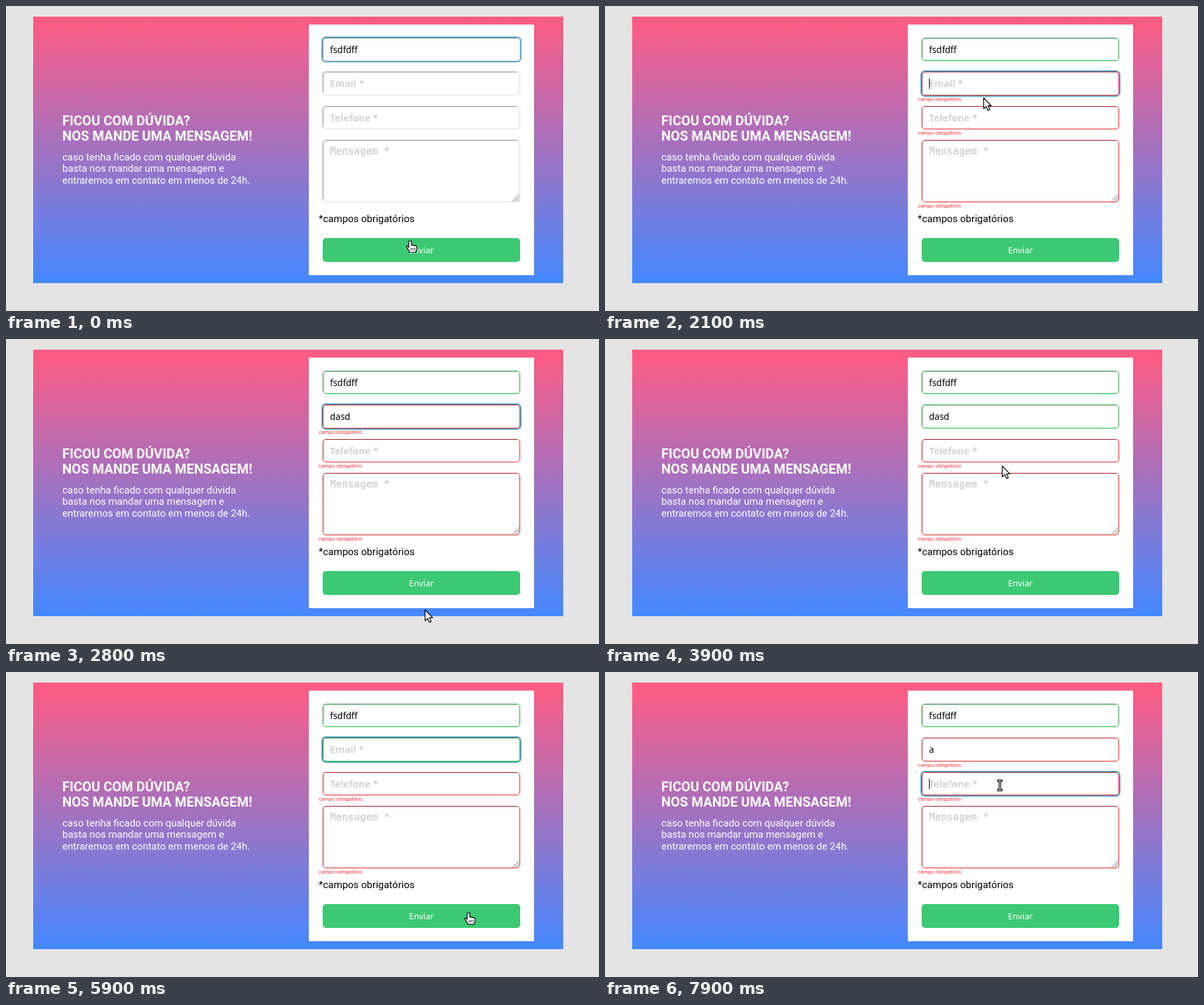
Recreate the animation shown at these times as an HTML page. Size 895 by 460 pixels, loop 8 s.

```html
<!DOCTYPE html>
<html lang="pt-BR">
<head>
<meta charset="utf-8">
<title>Formulário de contato</title>
<style>
  html, body { margin: 0; width: 100%; height: 100%; overflow: hidden; background: #e4e4e4; }
  svg { display: block; width: 895px; height: 460px; }
  text { white-space: pre; }
  .title { font: bold 20.1px Roboto, sans-serif; fill: #fff; }
  .body { font: 15px Roboto, sans-serif; }
  .error { font: 8px Roboto, sans-serif; fill: #ea2f38; }
  .value { font: 13.5px "Noto Sans", sans-serif; font-variant-ligatures: none; }
  .hint { font: bold 14.4px "Noto Sans", sans-serif; fill: #d3d3d3; }
  .mono { font: bold 15px "DejaVu Sans Mono", monospace; }
  .button { font: 12.8px "Noto Sans", sans-serif; fill: #fff; }
  .white { fill: #fff; }
  .option { fill: #dcdcdc; }
  .edge { fill: none; }
  .ring { fill: none; stroke: #62a5ca; stroke-width: 2; }
  .pointer { fill: #fff; stroke: #000; stroke-width: 1.2; stroke-linejoin: round; }
</style>
</head>
<body>
<svg viewBox="0 0 895 460">
  <defs>
    <linearGradient id="sky" x2="0" y2="1">
      <stop stop-color="#ff5b82"/><stop offset="1" stop-color="#4489ff"/>
    </linearGradient>
  </defs>
  <rect x="41" y="16" width="800" height="402" fill="url(#sky)"/>
  <rect x="457" y="28" width="340" height="378" fill="#fff"/>
  <text class="title" x="85" y="180">FICOU COM DÚVIDA?</text>
  <text class="title" x="85" y="203">NOS MANDE UMA MENSAGEM!</text>
  <text class="body white" x="85" y="233">caso tenha ficado com qualquer dúvida</text>
  <text class="body white" x="85" y="250">basta nos mandar uma mensagem e</text>
  <text class="body white" x="85" y="268">entraremos em contato em menos de 24h.</text>
  <text class="body" x="472" y="326">*campos obrigatórios</text>
  <rect x="478" y="350" width="298" height="36" rx="5" fill="#3dc973"/>
  <text class="button" x="627" y="373" text-anchor="middle">Enviar</text>
  <g id="fields"></g>
  <path d="M764 294.5L774.5 284M767 294.5L774.5 287M770 294.5L774.5 290M773 294.5L774.5 293" stroke="#858585"/>
  <rect id="selection" y="109" height="17" fill="#308cc6"/>
  <text id="selected" class="value white" y="122"></text>
  <rect id="caret" width="1" height="16"/>
  <g id="menu">
    <rect id="menuBox" x="478.5" y="134.5" width="297" fill="#3c3c3c" stroke="#262626"/>
    <rect id="hover" x="479" y="157" width="296" height="21" fill="#565656"/>
    <text class="value option" x="485" y="152">das</text>
    <text id="second" class="value option" x="485" y="172">dsd</text>
  </g>
  <g id="cursor">
    <path id="arrow" class="pointer" d="M.5 .5V17L4.3 13.4L7 19.4L9.7 18.2L7.1 12.3H12Z"/>
    <g id="hand">
      <path class="pointer" d="M-2 9V1Q-2 -1 0 -1T2 1V6Q4 4.5 5 6.5Q7 5.5 8 7Q10 6 10 8.5V12Q10 14 8.5 15V16.5H-1V15Q-3 13 -5.5 8.5Q-6 6.5 -4 7Z"/>
      <path d="M1.5 10v3.5M4.2 10v3.5M7 10v3.5" stroke="#000"/>
    </g>
    <g id="beam" fill="none" stroke-linecap="square">
      <path d="M-2 -7H2M0 -7V7M-2 7H2" stroke="#000" stroke-width="3.6"/>
      <path d="M-2 -7H2M0 -7V7M-2 7H2" stroke="#fff" stroke-width="1.2"/>
    </g>
  </g>
</svg>
<script>
const LOOP = 8000, STEP = 100, TEXT_X = 489;
const $ = id => document.getElementById(id);
const show = (el, on) => el.setAttribute('visibility', on ? 'inherit' : 'hidden');
const set = (el, attrs) => { for (const k in attrs) el.setAttribute(k, attrs[k]); };

const EDGES = {
  plain: ['#858585', '#dedede'],
  valid: ['#0a7a20', '#10b534'],
  wrong: ['#a01a1e', '#e0262c']
};

function add(parent, tag, attrs, text = '') {
  const el = document.createElementNS('http://www.w3.org/2000/svg', tag);
  set(el, attrs);
  el.textContent = text;
  return parent.appendChild(el);
}

function makeField(hint, index) {
  const tall = hint.startsWith('Mensagem');
  const top = Math.floor(48 + 51.5 * index), height = tall ? 94 : 35 + index % 2 * (index === 1);
  const g = $('fields'), x = 478.5, y = top + .5, w = 297, h = height - 1, r = 4.5;
  const arc = (dx, dy) => `a${r} ${r} 0 0 1 ${dx} ${dy}`;
  const base = top + (tall ? 22 : 23);
  return {
    top, height,
    ring: add(g, 'rect', { class: 'ring', x: 477, y: top - 1, width: 300, height: height + 2, rx: 6 }),
    box: add(g, 'rect', { x, y, width: w, height: h, rx: r, fill: '#fff' }),
    light: add(g, 'path', { class: 'edge',
      d: `M${x + w - r} ${y}${arc(r, r)}V${y + h - r}${arc(-r, r)}H${x + r}${arc(-r, -r)}` }),
    dark: add(g, 'path', { class: 'edge', d: `M${x} ${y + h - r}V${y + r}${arc(r, -r)}H${x + w - r}` }),
    hint: add(g, 'text', { class: tall ? 'hint mono' : 'hint', x: TEXT_X, y: base }, hint),
    value: add(g, 'text', { class: 'value', x: TEXT_X, y: base }),
    error: add(g, 'text', { class: 'error', x: 472, y: top + height + 8 }, 'campo obrigatório')
  };
}

const fields = ['', 'Email *', 'Telefone *', 'Mensagem *'].map(makeField);
const [name, email, phone] = fields;

// The visitor's actions
const clicks = [[-1000, name], [100, null], [1900, email], [3300, null],
  [4400, email], [6000, null], [6900, email], [7700, phone]];
const submits = [300, 3300, 6200];
const drag = { start: 4400, end: 4900 };
const typing = [{ start: 2200, text: 'dasd' }, { start: drag.end, text: '' }, { start: 7400, text: 'a' }];
const suggestions = ['das', 'dsd'];

// Pointer moves: start, end, x, y
const moves = [
  [700, 800, 564, 151], [900, 1100, 562, 120], [2000, 2400, 586, 169], [2400, 2800, 632, 408],
  [3200, 3300, 645, 366], [3500, 4200, 583, 130], [4400, 4700, 458, 116], [4800, 5100, 520, 100],
  [5100, 5700, 783, 328], [5700, 5900, 698, 364], [6100, 6600, 597, 122], [7000, 7300, 595, 168],
  [7800, 7900, 596, 171]
];
const easeOut = k => 1 - (1 - k) ** 1.6;

function pointerAt(t) {
  let x = 610, y = 355;
  for (const [start, end, toX, toY] of moves) {
    const k = easeOut(Math.min(1, Math.max(0, (t - start) / (end - start))));
    x += (toX - x) * k;
    y += (toY - y) * k;
  }
  return [Math.round(x), Math.round(y)];
}

function textAt(field, t) {
  if (field === name) return 'fsdfdff';
  const entry = field === email && typing.findLast(e => e.start <= t);
  return entry ? entry.text.slice(0, (t - entry.start) / STEP + 1) : '';
}

function stateAt(field, t) {
  const submit = submits.findLast(s => s <= t);
  if (submit === undefined) return 'plain';
  return textAt(field, submit) ? 'valid' : 'wrong';
}

function pointerKind(dragging, x, y, menuBottom) {
  if (dragging) return 'beam';
  if (x < 478 || x > 776 || (y > 135 && y < menuBottom)) return 'arrow';
  if (y >= 350 && y < 386) return 'hand';
  return fields.some(f => y >= f.top && y < f.top + f.height) ? 'beam' : 'arrow';
}

function drawField(field, t, active) {
  const state = stateAt(field, t), text = textAt(field, t);
  const [dark, light] = EDGES[state];
  set(field.dark, { stroke: dark });
  set(field.light, { stroke: light });
  show(field.ring, field === active);
  show(field.error, state === 'wrong');
  show(field.hint, !text);
  field.value.textContent = text;
}

function drawSelection(on, text, width, pointerX) {
  const letter = width / text.length;
  const from = Math.max(0, Math.round((pointerX - TEXT_X) / letter));
  const visible = on && from < text.length;
  show($('selection'), visible);
  show($('selected'), visible);
  if (!visible) return;
  const x = TEXT_X + (from ? email.value.getSubStringLength(0, from) : 0);
  set($('selection'), { x, width: TEXT_X + width - x });
  set($('selected'), { x });
  $('selected').textContent = text.slice(from);
}

function drawMenu(rows, bottom, y) {
  show($('menu'), rows);
  show($('second'), rows > 1);
  show($('hover'), rows > 1 && y >= 157 && y < 178);
  set($('menuBox'), { height: Math.max(0, bottom - 135) });
}

function draw(time) {
  const t = Math.floor(time / STEP) * STEP;
  const [focusedAt, active] = clicks.findLast(c => c[0] <= t);
  const [x, y] = pointerAt(t);
  for (const field of fields) drawField(field, t, active);

  const text = textAt(email, t);
  const width = text ? email.value.getComputedTextLength() : 0;
  const dragging = t >= drag.start && t < drag.end;
  drawSelection(dragging, text, width, x);

  show($('caret'), active && t - focusedAt < 800);
  if (active) set($('caret'), { x: Math.round(TEXT_X + (active === email ? width : 0)), y: active.top + 10 });

  const partial = active === email && text && text.length < 4;
  const rows = partial ? suggestions.filter(s => s.includes(text[0])).length : 0;
  const menuBottom = rows ? 139 + rows * 20.5 : 0;
  drawMenu(rows, menuBottom, y);

  const kind = pointerKind(dragging, x, y, menuBottom);
  for (const id of ['arrow', 'hand', 'beam']) show($(id), id === kind);
  set($('cursor'), { transform: `translate(${x} ${y})` });
}

const start = performance.now();
function tick() {
  draw((performance.now() - start) % LOOP);
  requestAnimationFrame(tick);
}
tick();
</script>
</body>
</html>
```
